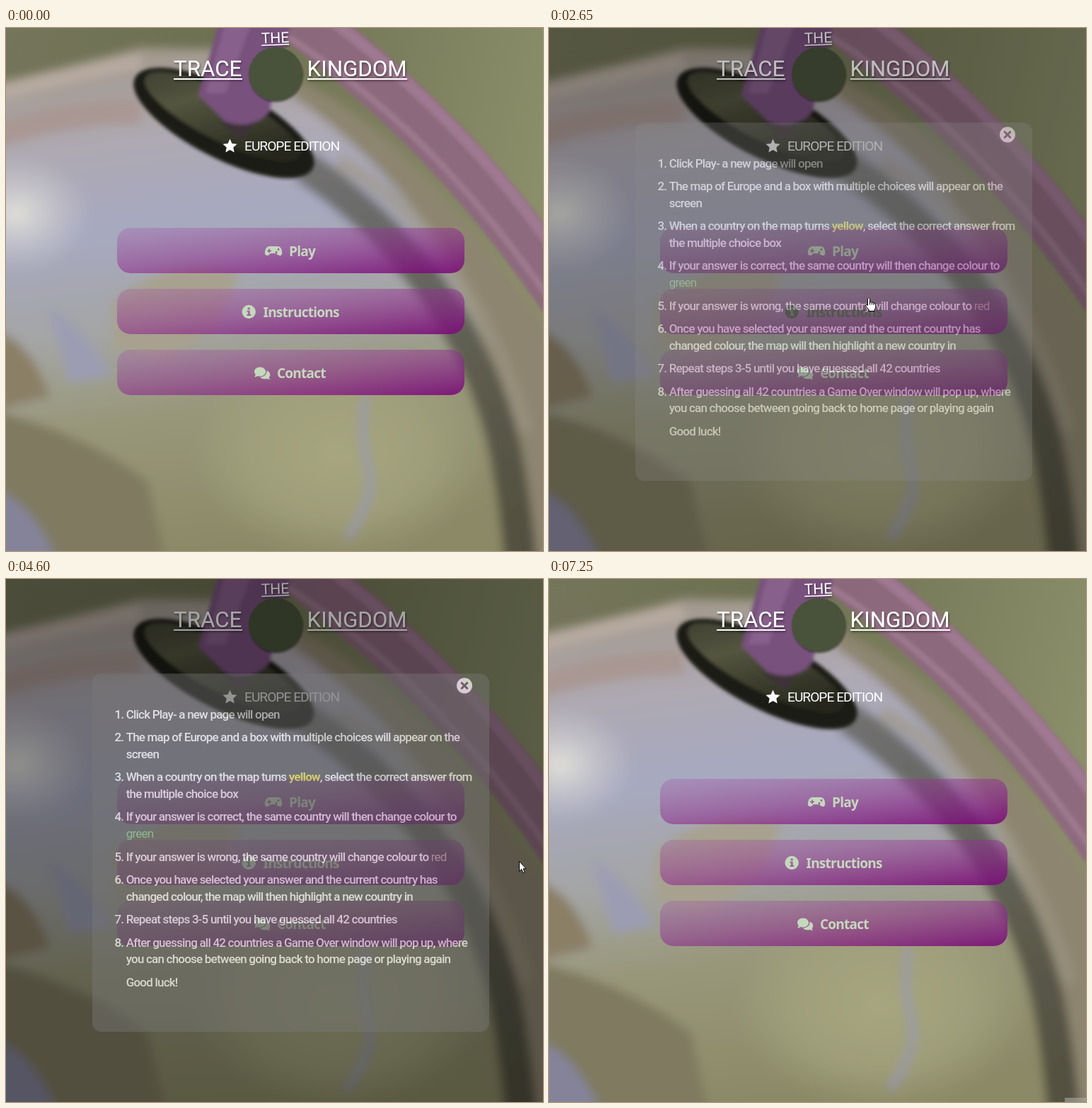
Animation of 759 by 738 pixels, one loop 7320 ms. Source, as an HTML page:

```html
<!DOCTYPE html>
<html lang="en">
<head>
<meta charset="utf-8">
<title>Map quiz menu</title>
<style>
html, body { margin: 0; width: 100%; height: 100%; overflow: hidden; background: #83855f; }
svg { display: block; width: 759px; height: 738px; }
text { font-family: Roboto, Arial, sans-serif; fill: #fff; }
.title { font-size: 31.3px; }
.label { font: 700 19px "Noto Sans", "Open Sans", sans-serif; letter-spacing: -.75px; fill: inherit; }
.rules text { font-size: 17px; font-weight: 500; letter-spacing: -.8px; }
.rules .tone { font-weight: 400; }
.line { fill: none; }
</style>
</head>
<body>
<svg id="stage" viewBox="0 0 759 738">
  <defs>
    <linearGradient id="wall" x1="0" y1="0" x2="1" y2=".25">
      <stop offset="0" stop-color="#74755a"/><stop offset=".4" stop-color="#6d7051"/><stop offset="1" stop-color="#8a8e69"/>
    </linearGradient>
    <linearGradient id="sphere" gradientUnits="userSpaceOnUse" x1="170" y1="40" x2="260" y2="738">
      <stop offset="0" stop-color="#a39a8e"/><stop offset=".17" stop-color="#aea9b2"/>
      <stop offset=".34" stop-color="#a7a9c0"/><stop offset=".55" stop-color="#a4a5a4"/>
      <stop offset=".72" stop-color="#98977a"/><stop offset="1" stop-color="#8b8966"/>
    </linearGradient>
    <linearGradient id="band" gradientUnits="userSpaceOnUse" x1="430" y1="200" x2="720" y2="700">
      <stop offset="0" stop-color="#5d5c55" stop-opacity=".75"/><stop offset="1" stop-color="#4b493b" stop-opacity=".88"/>
    </linearGradient>
    <radialGradient id="shine">
      <stop offset="0" stop-color="#e6e5dc" stop-opacity=".9"/><stop offset="1" stop-color="#d5d3d4" stop-opacity="0"/>
    </radialGradient>
    <radialGradient id="land">
      <stop offset="0" stop-color="#a6a67f"/><stop offset=".6" stop-color="#a3a27d" stop-opacity=".8"/>
      <stop offset="1" stop-color="#a3a27d" stop-opacity="0"/>
    </radialGradient>
    <linearGradient id="disc" x1="0" y1="0" x2="1" y2=".3">
      <stop offset="0" stop-color="#3a3b30"/><stop offset=".4" stop-color="#54553f"/><stop offset="1" stop-color="#25261d"/>
    </linearGradient>
    <linearGradient id="bar" x1=".05" y1="0" x2=".9" y2="1">
      <stop offset="0" stop-color="#a04ca2" stop-opacity=".28"/><stop offset=".5" stop-color="#8f2c90" stop-opacity=".53"/>
      <stop offset="1" stop-color="#7b1079" stop-opacity=".88"/>
    </linearGradient>
    <filter id="soft" x="-10%" y="-10%" width="120%" height="120%"><feGaussianBlur stdDeviation="7"/></filter>
    <filter id="edge" x="-10%" y="-10%" width="120%" height="120%"><feGaussianBlur stdDeviation="2.4"/></filter>
    <filter id="shade" x="-20%" y="-20%" width="140%" height="150%">
      <feDropShadow dx="1" dy="2" stdDeviation="1.5" flood-color="#000" flood-opacity=".45"/>
    </filter>
  </defs>

  <rect width="759" height="738" fill="url(#wall)"/>
  <g filter="url(#soft)">
    <path d="M385 60C560 130 700 330 790 460V790H640Z" fill="#8d8570"/>
    <path d="M-40 84Q90 55 190 28L300 30C480 130 610 260 676 430C712 540 728 640 732 790H-40Z" fill="url(#sphere)"/>
    <path class="line" d="M-30 96Q90 66 190 46" stroke="#b7aaa0" stroke-width="22"/>
    <path class="line" d="M-30 158Q70 118 190 118" stroke="#a8938c" stroke-width="34" opacity=".75"/>
    <path d="M150 385Q230 320 330 345L300 420 220 470 150 450Z" fill="#a8a18f"/>
    <path d="M60 395Q110 420 150 490L90 500Z" fill="#9c9db2"/>
    <path d="M-20 425Q35 440 62 520L-20 540Z" fill="#8b7f66"/>
    <ellipse cx="470" cy="600" rx="210" ry="150" fill="url(#land)"/>
    <path d="M-20 540Q110 570 200 640L230 770H-20Z" fill="#7f7a61"/>
    <path d="M-20 650Q40 665 80 770H-20Z" fill="#85839a"/>
    <path class="line" d="M508 520Q500 580 512 620T482 720" stroke="#9898b4" stroke-width="8"/>
    <path class="line" d="M420 194C530 268 655 395 702 580Q720 660 730 780" stroke="url(#band)" stroke-width="46"/>
    <path class="line" d="M470 188C565 240 670 350 735 570" stroke="#9f9682" stroke-width="22" opacity=".6"/>
    <ellipse cx="15" cy="262" rx="105" ry="85" fill="url(#shine)"/>
  </g>
  <g filter="url(#edge)">
    <path class="line" d="M405 -20C550 85 670 205 790 380" stroke="#8e687f" stroke-width="75" opacity=".92"/>
    <path class="line" d="M448 -20C570 70 690 185 790 335" stroke="#9f7891" stroke-width="16"/>
    <path class="line" d="M395 10C540 102 660 225 775 392" stroke="#a98499" stroke-width="9" opacity=".6"/>
    <g transform="rotate(27 308 134)">
      <ellipse cx="308" cy="134" rx="141" ry="50" fill="#1c1d17"/>
      <ellipse cx="302" cy="127" rx="122" ry="34" fill="url(#disc)"/>
    </g>
    <path d="M303 -15H405L372 118Q350 145 310 132L272 95Z" fill="#78517d"/>
    <path d="M312 -15H350L310 92 282 92Z" fill="#87608b"/>
    <path d="M300 130Q335 143 352 132L333 158Z" fill="#3c3039"/>
  </g>

  <g filter="url(#shade)">
    <g transform="rotate(-2 381 20)">
      <text x="361" y="21" font-size="21">THE</text>
      <path d="M361 23.7H400" stroke="#fff" stroke-width="1.5"/>
    </g>
    <text class="title" x="237" y="68.3">TRACE</text>
    <text class="title" x="425.5" y="68.3">KINGDOM</text>
    <path d="M237 72H334M426 72H567" stroke="#fff" stroke-width="1.8"/>
    <circle cx="381" cy="65" r="38" fill="#48533a"/>
  </g>
  <polygon id="star" fill="#fff"/>
  <text x="337" y="173" font-size="19.2" letter-spacing="-1">EUROPE EDITION</text>

  <g id="bars"></g>

  <g id="modal" class="rules">
    <rect width="759" height="738" opacity=".56"/>
    <rect x="122" y="133.5" width="561" height="505.5" rx="13" fill="#525252"/>
    <circle cx="648" cy="150.5" r="11" fill="#fff"/>
    <path d="M644.2 146.7l7.6 7.6m0-7.6l-7.6 7.6" stroke="#525252" stroke-width="3" stroke-linecap="round"/>
    <g id="rules"></g>
  </g>

  <circle id="click" r="10.6" fill="#e1d700" opacity=".63"/>
  <g id="arrow" fill="#fff" stroke="#000"><path d="M.5 .5V14.5L3.7 11.6 6 16.7 8.2 15.8 6 10.8H10.2Z"/></g>
  <g id="hand" fill="#fff" stroke="#000" stroke-linejoin="round">
    <path d="M-1.5 2Q0 -.8 1.5 2V7Q3.3 5.8 4.3 7.6Q6 6.5 7 8.3Q9.5 7.5 9.7 10V14Q9.5 16 8 17.5V19.5H.2V17.8Q-2.6 14.5 -4.5 11.7Q-4.3 9.5 -1.5 11.4Z"/>
    <path d="M1.5 7V10.5M4.3 7.6V10.5M7 8.3V11" fill="none"/>
  </g>
  <path id="beam" d="M-4 -8.5H-1Q0 -8.5 0 -7V7Q0 8.5 -1 8.5H-4M4 -8.5H1Q0 -8.5 0 -7V7Q0 8.5 1 8.5H4" class="line" stroke="#e8e8e8" stroke-width="1.2"/>
  <rect id="corner" x="729" y="732" width="30" height="6" fill="#aaa9a6"/>
</svg>
<script>
const LOOP = 7320;
const LIGHT = '#c5d8bd', DARK = '#4d5b43';
const $ = id => document.getElementById(id);
const show = (el, on) => el.setAttribute('visibility', on ? 'visible' : 'hidden');

$('star').setAttribute('points', Array.from({ length: 10 }, (_, i) => {
  const a = i * Math.PI / 5, r = i % 2 ? 5 : 10.5;
  return [316.5 + r * Math.sin(a), 167 - r * Math.cos(a)].map(v => v.toFixed(1));
}).join(' '));

const icons = {
  pad: `<path d="M372 308H384Q389 308 390 315T386.5 321Q384 321 382 318H374Q372 321 369.5 321Q365 321 366 315T372 308Z"/>
    <path d="M369 314.5H375M372 311.5V317.5" stroke="#9a5a98" stroke-width="1.6"/>
    <circle cx="382" cy="316.5" r="1.4" fill="#9a5a98"/><circle cx="385" cy="312.5" r="1.4" fill="#9a5a98"/>`,
  info: `<path fill-rule="evenodd" d="M333.5 400.5a9.7 9.7 0 1 1 19.4 0a9.7 9.7 0 1 1 -19.4 0Z
    M341.7 394.5h3v3h-3ZM340.5 398.8h4.2v5.2h1.5v2h-5.7v-2h1.5v-3.2h-1.5Z"/>`,
  chat: `<path d="M359 478.5c5 0 8 3 8 6.5s-3 6.5 -8 6.5q-2 0 -3.5 -.6q-2 1.5 -4.5 1.5q1.7 -1.7 1.7 -3.5q-1.7 -1.7 -1.7 -3.9c0 -3.5 3 -6.5 8 -6.5Z"/>
    <path d="M368.5 483.5c3 1 4.8 3 4.8 5.7q0 2 -1.5 3.7q0 1.7 1.5 3.2q-2.5 0 -4.3 -1.4q-1.5 .5 -3.5 .5q-4.5 0 -6.5 -2.7c6 0 9.8 -3.5 9.5 -9Z"/>`
};
const bars = [['Play', 400, 282, 'pad'], ['Instructions', 363.5, 368, 'info'], ['Contact', 383, 454, 'chat']];
$('bars').innerHTML = bars.map(([name, x, y, icon]) =>
  `<rect x="157" y="${y}" width="491" height="64" rx="19" fill="url(#bar)"/>
   <g class="face">${icons[icon]}<text class="label" x="${x}" y="${y + 39.7}">${name}</text></g>`).join('');
const faces = document.querySelectorAll('.face');

const tone = (color, word, weight = 400) =>
  `<tspan class="tone" style="fill:${color};font-weight:${weight}">${word}</tspan>`;
const rules = [
  ['Click Play- a new page will open'],
  ['The map of Europe and a box with multiple choices will appear on the', 'screen'],
  [`When a country on the map turns ${tone('#e6e545', 'yellow', 600)}, select the correct answer from`, 'the multiple choice box'],
  ['If your answer is correct, the same country will then change colour to', tone('#80c884', 'green')],
  [`If your answer is wrong, the same country will change colour to ${tone('#c4b8a8', 'red')}`],
  ['Once you have selected your answer and the current country has', 'changed colour, the map will then highlight a new country in'],
  ['Repeat steps 3-5 until you have guessed all 42 countries'],
  ['After guessing all 42 countries a Game Over window will pop up, where', 'you can choose between going back to home page or playing again'],
  ['Good luck!']
];
let row = 196.7;
$('rules').innerHTML = rules.map((lines, i) => {
  const mark = i < 8 ? `<text x="153.5" y="${row}">${i + 1}.</text>` : '';
  const body = lines.map((s, k) => `<text x="169.7" y="${row + k * 23.7}">${s}</text>`).join('');
  row += 32.45 + (lines.length - 1) * 23.7;
  return mark + body;
}).join('');

// Index of the current step of a run of n changes, or -1 before it.
const step = (t, from, to, n) =>
  t < from ? -1 : Math.min(n - 1, Math.floor((t - from) / (to - from) * (n - 1) + .01));
const mix = (a, b, p) => a + (b - a) * p;
const smooth = p => p * p * (3 - 2 * p);

function pointer(t) {
  if (t < 1490 || t >= 6550) return null;
  if (t < 3590) {
    const p = smooth(step(t, 1490, 2180, 10) / 9);
    return [mix(737, 452, p), mix(726, 380, p)];
  }
  if (t < 3820) return t < 3670 ? [556, 380] : [611, 379];
  if (t < 6010) {
    const p = Math.sin((step(t, 3820, 4050, 4) + 1) / 4 * Math.PI / 2);
    return [mix(611, 725, p), mix(379, 398, p)];
  }
  const p = step(t, 6010, 6550, 8) / 6;
  return [719 - 13 * Math.sin(p * Math.PI * .6), mix(420, 716, p ** 1.25)];
}

function fade(t) {
  if (t < 2650 || t >= 4760) return 0;
  if (t < 4600) return [.45, .94, 1][step(t, 2650, 2820, 3)];
  return t < 4670 ? .62 : .17;
}

function draw(t) {
  const pos = pointer(t), alpha = fade(t);
  const over = pos && t < 3590 && pos[0] < 648
    ? bars.findIndex(b => pos[1] >= b[2] && pos[1] <= b[2] + 64) : -1;
  faces.forEach((f, i) => f.setAttribute('fill', i === over ? DARK : LIGHT));
  $('modal').setAttribute('opacity', alpha);
  show($('modal'), alpha > 0);

  const kind = !pos ? '' : over >= 0 ? 'hand' : t >= 3590 && pos[0] < 630 ? 'beam' : 'arrow';
  for (const id of ['arrow', 'hand', 'beam', 'click']) {
    show($(id), id === kind);
    if (pos) $(id).setAttribute('transform', `translate(${pos.map(Math.round)})`);
  }
  show($('click'), t >= 2410 && t < 2650 || t >= 4450 && t < 4600);
  $('corner').setAttribute('opacity', (step(t, 7010, 7250, 4) + 1) / 4 * .6);
}

const start = performance.now();
function tick() {
  draw((performance.now() - start) % LOOP);
  requestAnimationFrame(tick);
}
tick();
</script>
</body>
</html>
```
